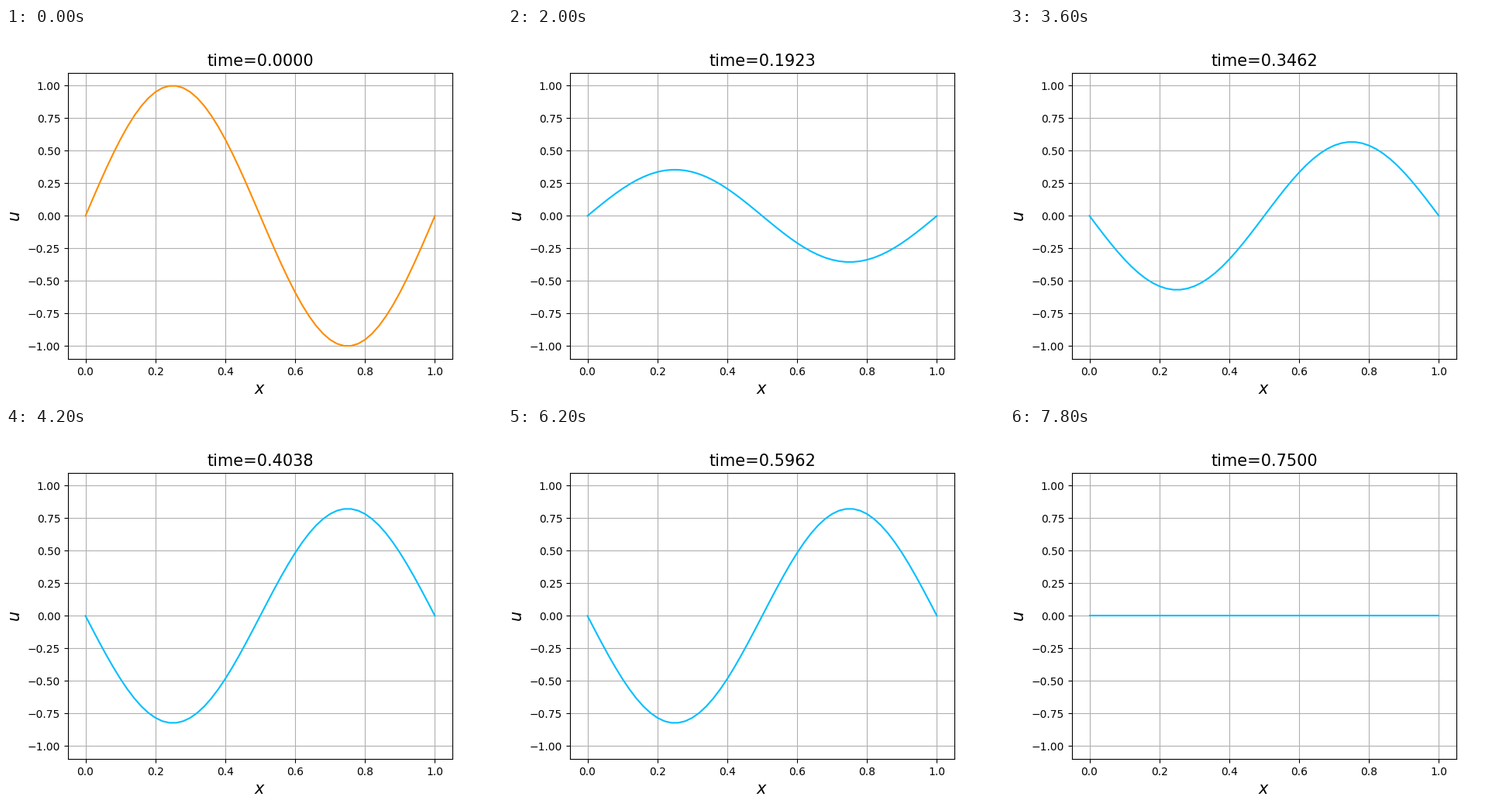
These frames come from a looping animation (640 px wide and 480 px high, 8 s). A matplotlib script:

```python
import matplotlib.pyplot as plt
import numpy as np
from matplotlib.animation import FuncAnimation

FRAMES = 40
INTERVAL = 200          # ms
STEPS_PER_PERIOD = 52   # time steps in one oscillation

x = np.linspace(0, 1, 51)
mode = np.sin(2 * np.pi * x)

fig, ax = plt.subplots(figsize=(6.4, 4.8), dpi=100)
ax.set_xlim(-0.05, 1.05)
ax.set_ylim(-1.1, 1.1)
ax.set_xlabel("$x$", fontsize=15)
ax.set_ylabel("$u$", fontsize=15)
ax.grid(True)
title = ax.set_title("", fontsize=15)
line, = ax.plot(x, mode, lw=1.5)


def update(n):
    """Standing wave; the initial state has its own colour."""
    t = n / STEPS_PER_PERIOD
    line.set_ydata(np.cos(2 * np.pi * t) * mode)
    line.set_color("darkorange" if n == 0 else "deepskyblue")
    title.set_text(f"time={t:.4f}")
    return line, title


def init():
    return update(0)


anim = FuncAnimation(fig, update, frames=FRAMES, init_func=init,
                     interval=INTERVAL, repeat=True, repeat_delay=0)
plt.show()
```
